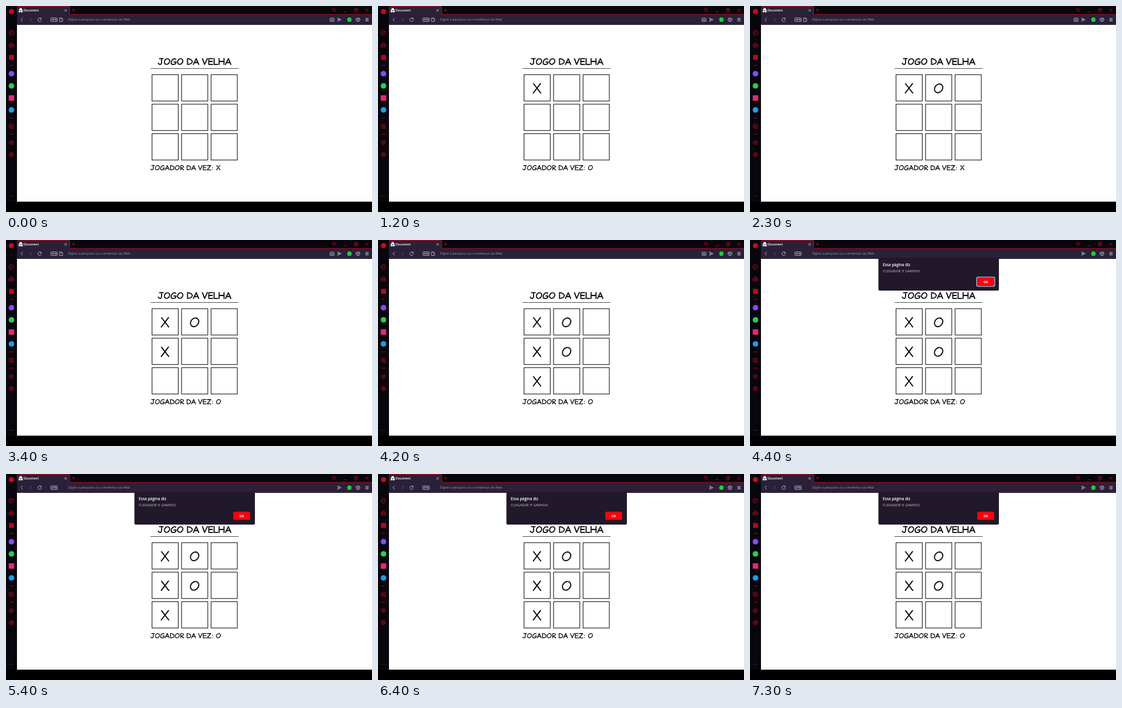
Recreate the animation shown at these times as an HTML page. Size 600x338 px, loop 7.4 s.

```html
<!DOCTYPE html>
<html lang="pt-BR">
<head>
<meta charset="utf-8">
<title>Jogo da Velha</title>
<style>
  html, body { margin: 0; width: 100%; height: 100%; overflow: hidden; background: #000; }
  svg { display: block; width: 100%; height: 100%; }
  text { font-family: "Open Sans", "Noto Sans", sans-serif; }
  .red { fill: none; stroke: #b9071c; stroke-width: .9; }
  .tool { fill: none; stroke: #c9c4d2; stroke-width: .8; }
  .hand { fill: none; stroke: #111; stroke-linecap: round; stroke-linejoin: round; }
  .cell { fill: #fff; stroke: #222; stroke-width: 1.1; }
</style>
</head>
<body>
<svg id="stage" viewBox="0 0 600 338">
  <defs>
    <path id="cube" d="M0-3.2 3-1.7V1.7L0 3.2-3 1.7V-1.7ZM-3-1.7 0-.2 3-1.7M0-.2V3.2"/>
  </defs>

  <!-- window -->
  <rect width="600" height="338" fill="#000"/>
  <rect width="600" height="14" fill="#08060d"/>
  <rect width="18" height="321" fill="#08060d"/>
  <rect x="18" y="14" width="582" height="17" fill="#2a2139"/>
  <rect x="18" y="31" width="582" height="290" fill="#fff"/>
  <path d="M18 14V2.5Q18 .5 20 .5H103Q105 .5 105 2.5V14Z" fill="#2a2139"/>
  <path d="M18.5 13V2.5Q18.5.5 20.5.5H102.5Q104.5.5 104.5 2.5V13.7H600" class="red" stroke-width=".7"/>

  <!-- tab -->
  <g fill="#fff">
    <path d="M21.7 6.2 22.5 3.4H25.7L26.5 6.2H27.7V7H20.5V6.2Z"/>
    <circle cx="22.3" cy="8.9" r="1.7"/>
    <circle cx="25.9" cy="8.9" r="1.7"/>
    <text x="29" y="9.2" font-size="4.9" font-weight="600">Document</text>
  </g>
  <path class="tool" d="M95.8 5.3 99.6 9.1M99.6 5.3 95.8 9.1"/>
  <path class="red" d="M108.2 7H113.4M110.8 4.4V9.6"/>
  <g class="red">
    <circle cx="537.5" cy="6" r="2.2"/>
    <path d="M539.2 7.8 541.6 10.2M553.5 9.3H558.5M571 5.7H575V9.7H571ZM572.4 5.5V4.2H576.4V8.2H575.2M589 4.5 594 9.5M594 4.5 589 9.5"/>
  </g>

  <!-- address bar -->
  <g class="tool">
    <path d="M27.3 19.5 24.5 22.4 27.3 25.3"/>
    <path d="M39 19.5 41.8 22.4 39 25.3" stroke="#665d75"/>
    <path d="M57.3 20.6A2.9 2.9 0 1 0 58 22.8M57.8 19V21.2H55.5"/>
    <rect x="73.5" y="19.6" width="10.5" height="5.8" rx=".8"/>
    <path d="M543.7 19.7 549.4 22.4 543.7 25.1 544.7 22.4ZM544.7 22.4H547"/>
    <use href="#cube" x="577" y="22.4"/>
    <path d="M589 20.4H594.5M589 22.4H594.5M589 24.4H594.5M593 19.7V21.1M590.5 21.7V23.1M592.5 23.7V25.1"/>
  </g>
  <text x="74.7" y="24" font-size="4" font-weight="600" fill="#ddd8e5">VPN</text>
  <g id="pageTools" class="tool">
    <path d="M87.8 19.4H91L92.8 21.2V25.4H87.8ZM90.8 19.5V21.4H92.7"/>
    <path d="M531.3 20.5H533L533.7 19.5H535.5L536.2 20.5H537.8V25.1H531.3Z"/>
    <circle cx="534.5" cy="22.8" r="1.2"/>
  </g>
  <text x="101.7" y="24.4" font-size="5.46" fill="#9b93a8">Digite a pesquisa ou o endereço da Web</text>
  <circle cx="563" cy="22.4" r="3.6" fill="#28c840"/>

  <!-- sidebar -->
  <circle cx="9" cy="9.3" r="4.3" fill="#c90820"/>
  <rect x="5" y="80.3" width="8" height="8" fill="#b9071c"/>
  <circle cx="9" cy="111" r="4.6" fill="#8a48fa"/>
  <circle cx="9" cy="131" r="4.6" fill="#25d051"/>
  <rect x="4.5" y="146.5" width="9" height="9" fill="#e12b70"/>
  <circle cx="9" cy="170.5" r="4.6" fill="#219be8"/>
  <g class="red">
    <circle cx="8.8" cy="44" r="3.7"/>
    <path d="M8 45 11 42.2M6 44.7H7.3"/>
    <path d="M5.2 63H12.4V67.3H5.2ZM6.7 63Q7 60 8.8 60T11 63M5.2 65H12.4"/>
    <path d="M6 97.3H12M6 183.7H12M6 210.3H12"/>
    <circle cx="8.7" cy="197.2" r="3.6"/>
    <path d="M7.8 195.5V199L10.5 197.2ZM10 200.4H13"/>
    <use href="#cube" x="8.8" y="224"/>
    <circle cx="8.8" cy="243.8" r="2.9"/>
    <circle cx="8.8" cy="243.8" r="1"/>
    <circle cx="8.8" cy="243.8" r="3.6" stroke-dasharray="1.4 1.43"/>
    <path d="M5 312.2H13" stroke-dasharray="1.6 1.4"/>
  </g>

  <!-- game -->
  <path d="M237 102.5H381.3" stroke="#555b52" stroke-width="1"/>
  <g id="board"></g>

  <!-- alert -->
  <g id="alert">
    <rect x="210.5" y="29" width="197.5" height="54" rx="2" fill="#211829"/>
    <text x="217.8" y="42.6" font-size="6.2" font-weight="600" fill="#fff">Essa página diz</text>
    <text x="217.8" y="53.1" font-size="5.2" fill="#d6d1dc">O JOGADOR 'X' GANHOU!</text>
    <rect id="ring" x="371.6" y="60.8" width="29.6" height="15.4" rx="2.4" fill="#211829" stroke="#b7c5f3" stroke-width="1.3"/>
    <rect id="button" x="372.6" y="61.8" width="27.6" height="13.4" rx="1.6"/>
    <text x="386.4" y="70.5" font-size="5" font-weight="700" fill="#fff" text-anchor="middle">OK</text>
  </g>
</svg>

<script>
const LOOP = 7400;
const ALERT_AT = 4300, ALERT_OPEN = 4400, RING_OFF = 5000;
const MOVES = [
  { at: 1200, mark: "X", col: 0, row: 0 },
  { at: 2000, mark: "O", col: 1, row: 0 },
  { at: 2700, mark: "X", col: 0, row: 1 },
  { at: 3500, mark: "O", col: 1, row: 1 },
  { at: 4100, mark: "X", col: 0, row: 2 }
];

// Handwritten capitals: advance and pen strokes, 100 units per em.
const GLYPHS = {
  " ": [30, ""],
  ":": [36, "M18-43v1M18-11v1"],
  A: [73, "M6-3 38-69 66-3M17-25H57"],
  D: [72, "M12-69V-4C42-5 66-18 66-35S40-67 12-69"],
  E: [61, "M55-69H11V-4H55M11-37H50"],
  G: [68, "M58-61C53-68 47-70 42-68 22-64 6-42 6-24 6-10 18-3 31-3 48-3 60-15 62-31H37"],
  H: [77, "M11-70V-3M66-70V-3M11-37H66"],
  J: [66, "M21-69H63M46-69 44-20C42 0 14 2 8-18"],
  L: [55, "M10-70V-4H51"],
  O: [80, "M19-10A27 33.4 39 0 1 61-62 27 33.4 39 0 1 19-10Z"],
  R: [63, "M11-3V-67C36-74 54-62 52-50 50-38 34-33 14-31L56-4"],
  V: [65, "M5-69 29-4 60-70"],
  X: [72, "M11-69 62-3M60-70 9-3"],
  Z: [69, "M10-68H60L8-4H63"]
};

const $ = id => document.getElementById(id);

function add(parent, tag, attrs) {
  const node = document.createElementNS("http://www.w3.org/2000/svg", tag);
  for (const name in attrs) node.setAttribute(name, attrs[name]);
  return parent.appendChild(node);
}

function write(text, x, y, size, weight) {
  const scale = size / 100;
  const group = add($("board"), "g", {
    class: "hand", role: "img", "aria-label": text,
    transform: `translate(${x} ${y}) scale(${scale})`, "stroke-width": weight / scale
  });
  let pen = 0;
  for (const letter of text) {
    const [advance, d] = GLYPHS[letter];
    add(group, "path", { d, transform: `translate(${pen})` });
    pen += advance;
  }
  return group;
}

const show = (node, on) => node.setAttribute("visibility", on ? "visible" : "hidden");

const PITCH = 48.4;
for (let i = 0; i < 9; i++) {
  add($("board"), "rect", {
    class: "cell", x: 239.4 + PITCH * (i % 3), y: 112.7 + PITCH * Math.floor(i / 3),
    width: 43, height: 43.2
  });
}

write("JOGO DA VELHA", 248.5, 96.4, 14.6, 1.8);
write("JOGADOR DA VEZ:", 236.5, 269.3, 11.1, 1.3);
const turns = { X: write("X", 344, 269.3, 11.1, 1.3), O: write("O", 343.9, 269.3, 11.1, 1.3) };

for (const move of MOVES) {
  const left = move.mark === "X" ? 252.5 : 251.6;
  move.node = write(move.mark, left + PITCH * move.col, 143.4 + PITCH * move.row, 23, 1.9);
}

function draw(t) {
  const played = MOVES.filter(move => t >= move.at).length;
  MOVES.forEach((move, i) => show(move.node, i < played));
  show(turns.X, played % 2 === 0);
  show(turns.O, played % 2 === 1);

  const opening = t < ALERT_OPEN;
  show($("pageTools"), t < ALERT_AT);
  show($("alert"), t >= ALERT_AT);
  show($("ring"), t >= ALERT_AT && t < RING_OFF);
  $("alert").setAttribute("opacity", opening ? .75 : 1);
  $("alert").setAttribute("transform", `translate(0 ${opening ? -4.4 : 0})`);
  $("button").setAttribute("fill", opening ? "#e0085c" : "#fa0010");
}

const start = performance.now();
function tick(now) {
  draw(Math.max(0, now - start) % LOOP);
  requestAnimationFrame(tick);
}
draw(0);
requestAnimationFrame(tick);
</script>
</body>
</html>
```
